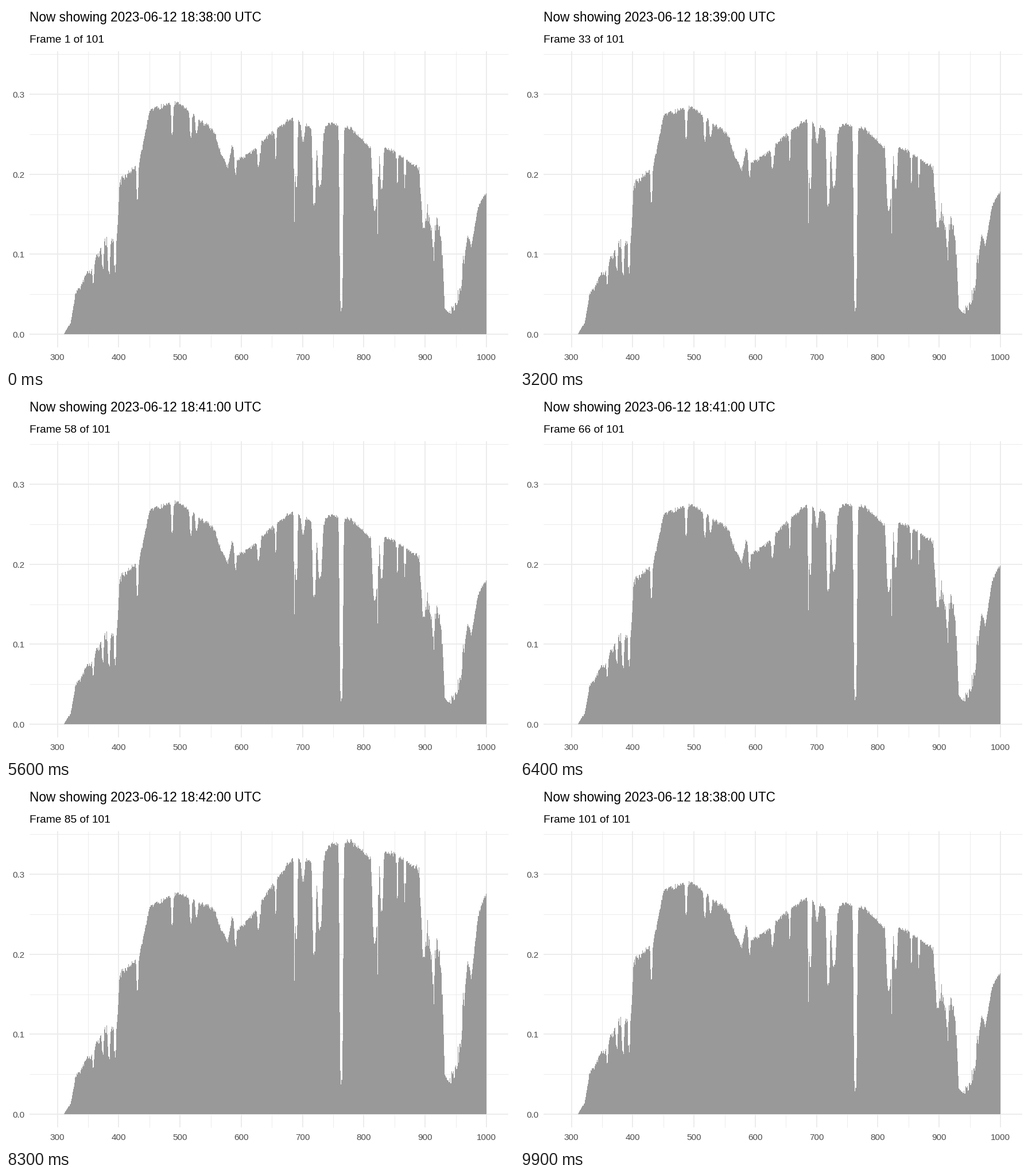
Write a matplotlib script that moves like this. It is 885 by 632 pixels and loops after 10 s.

```python
import numpy as np
import matplotlib.pyplot as plt
from matplotlib.animation import FuncAnimation

W, H, DPI = 885, 632, 100
LEFT, RIGHT, TOP, BOTTOM = 41, 875, 78.5, 596
FRAMES, LABELS = 100, 101
GREY = "#4D4D4D"

# Envelope key points: wavelength in nm, level in thousandths
ENVELOPE = [
    (311, 1), (321, 14), (330, 51), (354, 80), (378, 117), (397, 123),
    (402, 191), (433, 214), (451, 281), (496, 290), (555, 254), (567, 226),
    (578, 208), (585, 236), (592, 216), (622, 231), (641, 246), (661, 258),
    (681, 270), (714, 258), (748, 264), (779, 257), (806, 236), (848, 229),
    (890, 208), (897, 130), (904, 153), (912, 123), (920, 147), (927, 116),
    (932, 32), (938, 27), (952, 37), (970, 125), (975, 109), (988, 163),
    (1000, 176),
]

# Absorption lines: centre, half width, depth
LINES = [
    (358.5, 2, .22), (374, 2, .26), (384, 2.5, .36), (394, 1.6, .36),
    (430.5, 2, .21), (487, 2, .14), (517.5, 2.2, .115), (527, 2, .07),
    (590, 2, .09), (628.5, 2.5, .11), (656.5, 1.4, .14), (687, 1.1, .48),
    (690, 1.8, .31), (701, 3, .08), (719, 3, .38), (728.5, 5, .29),
    (763.2, 3.1, .89), (818, 5, .34), (823, .9, .38), (829, 3, .22),
    (854.5, 1.2, .17), (867, 1.2, .16), (914, 1.2, .24),
]

# Each minute: level at short wavelengths, extra gain towards the infrared
MINUTES = [(1, 0), (.978, .032), (.955, .065), (.935, .195), (.915, .66)]


def px(nm):
    return 89.7 + (nm - 300) * 1.0674


def py(v):
    return 573 - 1396 * v


def bump(x, centre, width, power):
    return np.exp(-np.abs((x - centre) / width) ** power)


def base_spectrum(nm):
    v = np.interp(nm, *zip(*ENVELOPE), left=0) / 1000
    for centre, width, depth in LINES:
        v *= 1 - depth * bump(nm, centre, width, 3)
    # Ripple is strongest in the ultraviolet and the water bands
    ripple = (.006 + .03 * bump(nm, 350, 55, 4) + .03 * bump(nm, 910, 18, 4)
              + .12 * bump(nm, 952, 12, 4))
    noise = np.random.default_rng(12).normal(size=nm.size)
    return v * (1 + ripple * np.clip(noise, -1.8, 1.8))


def gain(nm, level, rise):
    u = np.clip((nm - 400) / 650, 0, 1)
    return level + rise * u * u * (3 - 2 * u)


# One bar per nm, laid on whole pixel columns
nm = np.arange(290, 1001)
edges = np.arange(80, 838)
column = np.rint(300 + (edges[:-1] + .5 - px(300)) / 1.0674).astype(int) - nm[0]
base = base_spectrum(nm)
tops = [np.rint(py(base * gain(nm, *m)))[column] for m in MINUTES]

plt.rcParams["font.family"] = ["Liberation Sans", "DejaVu Sans"]
fig = plt.figure(figsize=(W / DPI, H / DPI), dpi=DPI, facecolor="white")
ax = fig.add_axes([0, 0, 1, 1])
ax.set(xlim=(0, W), ylim=(H, 0))
ax.axis("off")


def text(x, y, s, size, color="black", ha="left"):
    return ax.text(x, y, s, fontsize=size * 72 / DPI, color=color, ha=ha, va="baseline")


def grid(xs, ys, width):
    style = dict(color="#EBEBEB", lw=width * 72 / DPI, zorder=1, solid_capstyle="butt")
    for x in xs:
        ax.plot([px(x)] * 2, [TOP, BOTTOM], **style)
    for y in ys:
        ax.plot([LEFT, RIGHT], [py(y)] * 2, **style)


x_ticks = range(300, 1001, 100)
y_ticks = [0, .1, .2, .3]
grid(range(350, 1000, 100), [.05, .15, .25, .35], .92)
grid(x_ticks, y_ticks, 1.84)
for x in x_ticks:
    text(px(x), 617.5, str(x), 15.2, GREY, "center")
for y in y_ticks:
    text(32.7, py(y) + 6, f"{y:.1f}", 15.2, GREY, "right")

bars = ax.stairs(tops[0], edges, baseline=py(0), fill=True,
                 color="#999999", lw=0, zorder=2)
title = text(LEFT, 27, "", 22.6)
subtitle = text(LEFT, 64, "", 19.1)


def update(i):
    # 101 steps spread over 100 pictures
    step = round(i * (LABELS - 1) / (FRAMES - 1))
    shown = step // 20 % len(MINUTES)
    closest = (step + 5) // 20 % len(MINUTES)
    bars.set_data(values=tops[shown])
    title.set_text(f"Now showing 2023-06-12 18:{38 + closest}:00 UTC")
    subtitle.set_text(f"Frame {step + 1} of {LABELS}")
    return bars, title, subtitle


anim = FuncAnimation(fig, update, frames=FRAMES, interval=100, repeat=True,
                     repeat_delay=0, blit=False)
plt.show()
```
